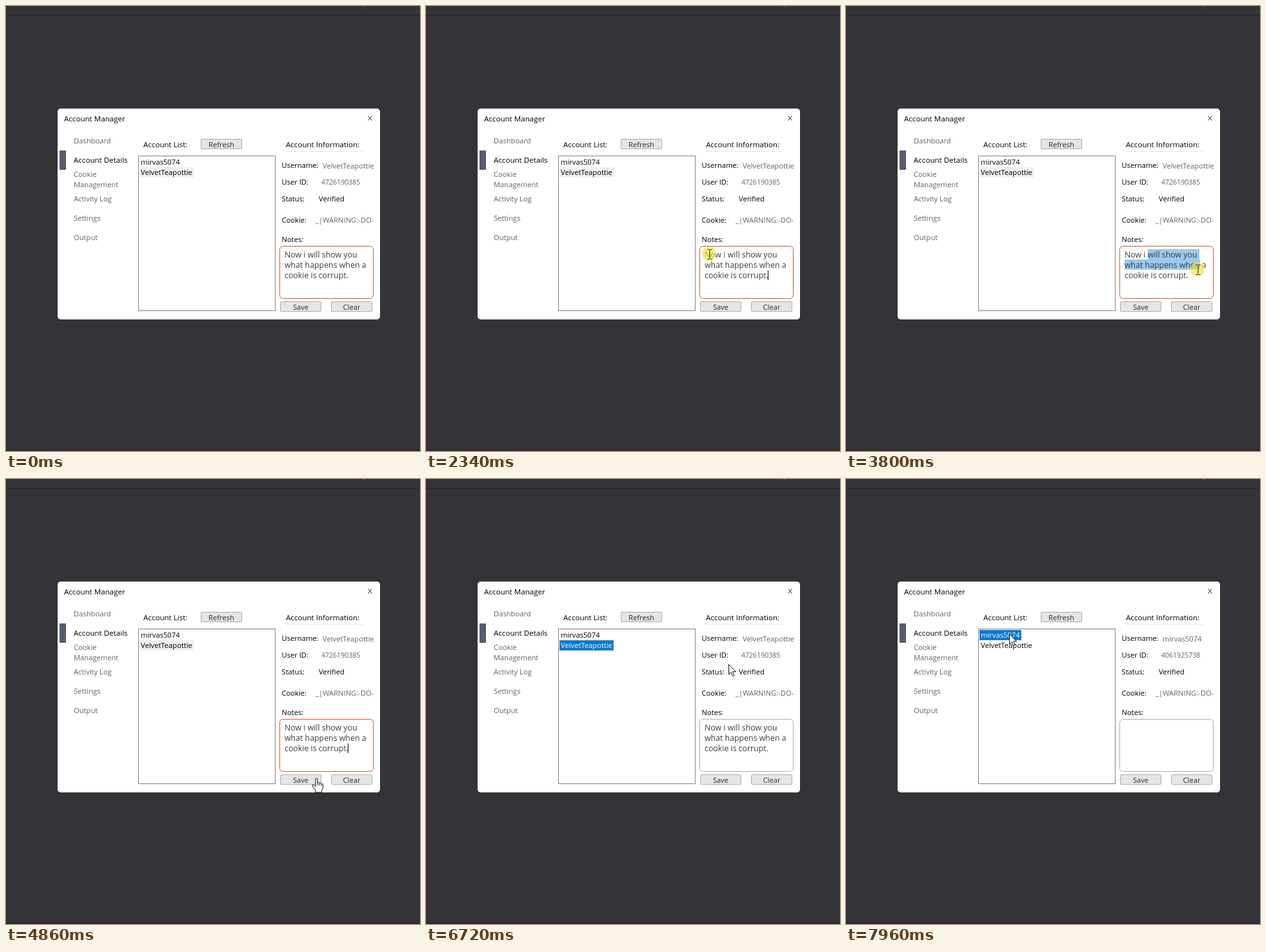
Animation of 642x690 px, one loop 8000 ms. Source, as an HTML page:

```html
<!DOCTYPE html>
<html lang="en">
<head>
<meta charset="utf-8">
<title>Account Manager</title>
<style>
  html, body { margin: 0; width: 642px; height: 690px; overflow: hidden; background: #333338; }
  svg { display: block; }
  text { font: 11.2px "Open Sans", "Noto Sans", sans-serif; fill: #000; }
  .head { font-size: 11.6px; }
  .dim { fill: #626262; }
  .num { font-size: 10.55px; }
  .mid { text-anchor: middle; fill: #2a2a2a; }
  .note { font-size: 12.35px; fill: #3c3c3c; }
  .button { fill: #e5e5e5; stroke: #adadad; }
  .cursor { fill: #fff; stroke: #111; stroke-linejoin: round; }
</style>
</head>
<body>
<svg width="642" height="690" viewBox="0 0 642 690">
  <rect width="642" height="690" fill="#333338"/>
  <path d="M0 14.5H642" stroke="#28282c" stroke-width="2"/>
  <path d="M0 689H642" stroke="#2b282b" stroke-width="2"/>
  <path d="M554 0h3" stroke="#99999c"/>
  <rect x="80" y="159" width="500" height="327" rx="5" fill="#fff" shape-rendering="crispEdges"/>
  <path d="M561.5 170.5l6 7m0 -7l-6 7" stroke="#444" stroke-width="1.1"/>
  <rect x="83" y="224" width="10" height="30" fill="#575c6e"/>
  <path d="M434 225.5H553" stroke="#e6e6e6"/>
  <rect x="205.5" y="232.5" width="212" height="240" fill="#fff" stroke="#82828a"/>
  <rect id="pick" x="207" height="16"/>
  <rect id="focusRing" x="207.5" height="15" fill="none" stroke="#ff8728" stroke-opacity=".6" stroke-dasharray="1"/>
  <rect id="notesBox" x="424.5" y="372.5" width="145" height="81" rx="5" fill="#fff"/>
  <g id="selection" fill="#99c9ef"></g>
  <g id="labels"></g>
  <path id="caret" d="M530.5 410V425" stroke="#000"/>
  <circle id="glow" r="11" fill="#f0e63c" fill-opacity=".65"/>
  <g id="pointer">
    <path id="arrow" class="cursor" d="M.5 .5V16L4 12.7L6.6 18.5L9 17.4L6.5 11.8H11.5Z"/>
    <path id="beam" fill="none" stroke="#222" d="M-3.5 -7.5H-1L0 -6.5L1 -7.5H3.5M0 -6.5V6.5M-3.5 7.5H-1L0 6.5L1 7.5H3.5"/>
    <path id="hand" class="cursor" d="M0 1.5Q0 0 1.5 0T3 1.5V7Q5.5 5.7 6 7.5Q8.4 6.6 9 8.5Q11.5 7.7 11.5 10.5V15L9.5 19V22H0V19L-4.5 13Q-6 10.5 -4 10Q-2.5 9.7 0 13ZM3 7V11M6 8V11.5M9 9V12"/>
  </g>
</svg>
<script>
const LOOP = 8000, START = 190, STEP = 69.35, GLOW = 140;
const LINE = 16, NOTE_X = 432, LIST_Y = 234;
const users = [
  { name: "mirvas5074", id: "4061925738" },
  { name: "VelvetTeapottie", id: "4726190385" }
];
const noteLines = ["Now i will show you", "what happens when a", "cookie is corrupt."];

// When each pointer action happens
const press = { focus: 2220, drag: 2670, release: 4300, deselect: 4360, save: 5190, second: 5980, first: 7740 };
// Pointer key points: time, x, y
const path = [
  [START, 601, 682], [950, 505, 491], [1370, 478, 373], [2080, 432, 384], [2340, 440, 385],
  [press.drag, 468, 383], [3800, 546, 409], [4050, 555, 435], [press.deselect, 540, 413],
  [4800, 480, 464], [5260, 480, 464], [press.second, 263, 257], [6300, 303, 294],
  [6710, 469, 287], [6930, 524, 302], [7610, 281, 251], [press.first, 253, 240]
];

const $ = id => document.getElementById(id);
const set = (node, attrs) => {
  for (const key in attrs) node.setAttribute(key, attrs[key]);
  return node;
};
const show = (node, on) => node.style.display = on ? "" : "none";
const within = (t, a, b) => t >= a && t < b;
const add = (tag, attrs, parent = $("labels")) =>
  parent.appendChild(set(document.createElementNS("http://www.w3.org/2000/svg", tag), attrs));
const label = (x, y, content, style = "") => {
  const node = add("text", { x, y, class: style });
  node.textContent = content;
  return node;
};
const button = (x, y, content) => {
  add("rect", { x: x + .5, y: y + .5, width: 63, height: 15, rx: 1.5, class: "button" });
  label(x + 32, y + 13, content, "mid");
};

label(90, 179, "Account Manager", "head");
label(213, 219, "Account List:", "head");
label(434, 219, "Account Information:", "head");
["Dashboard", "Account Details", "Cookie|Management", "Activity Log", "Settings", "Output"].forEach((entry, row) =>
  entry.split("|").forEach((part, i, parts) =>
    label(105, 213 + 30 * row + LINE * (i - (parts.length - 1) / 2), part, row === 1 ? "head" : "dim")));
["Username:", "User ID:", "Status:"].forEach((name, row) => label(427.5, 251 + 26 * row, name));
["Cookie:", "Notes:"].forEach((name, row) => label(427.5, 336 + 30 * row, name));
label(485, 303, "Verified");
label(480, 336, "_|WARNING:-DO-", "dim");
button(302, 206, "Refresh");
button(425, 458, "Save");
button(504, 458, "Clear");

const items = users.map((user, i) => label(209, LIST_Y + 12 + LINE * i, user.name));
const itemWidths = items.map(item => Math.round(item.getComputedTextLength()) + 4);
const userName = label(491, 252, "", "dim");
const userId = label(489, 277, "", "dim num");
const notes = noteLines.map((line, i) => label(NOTE_X, 390 + LINE * i, line, "note"));
const noteEnds = notes.map(note => Math.round(NOTE_X + note.getComputedTextLength() + 3));
const marks = notes.map((_, i) => add("rect", { y: 377 + LINE * i, height: LINE }, $("selection")));

function pointerAt(t) {
  const next = Math.max(1, path.findIndex(point => point[0] > t));
  if (t >= path.at(-1)[0]) return path.at(-1).slice(1);
  const [t0, x0, y0] = path[next - 1], [t1, x1, y1] = path[next];
  const f = Math.max(0, t - t0) / (t1 - t0);
  return [Math.round(x0 + (x1 - x0) * f), Math.round(y0 + (y1 - y0) * f)];
}

function drawSelection(t, x, y) {
  const start = path.find(point => point[0] === press.drag)[1];
  const line = y < 402 ? 0 : y < 418 ? 1 : 2;
  marks.forEach((mark, i) => {
    const left = i ? NOTE_X : start;
    const right = i < line ? noteEnds[i] : Math.min(x + 3, noteEnds[i]);
    show(mark, within(t, press.drag, press.deselect) && i <= line);
    set(mark, { x: left, width: Math.max(0, right - left) });
  });
}

function drawPointer(t, x, y) {
  const inNotes = within(x, 425, 570) && within(y, 377, 453);
  const onSave = within(x, 425, 489) && within(y, 458, 475);
  show($("pointer"), t >= START);
  set($("pointer"), { transform: `translate(${x} ${y})` });
  show($("arrow"), !inNotes && !onSave);
  show($("beam"), inNotes);
  show($("hand"), onSave);
  const pressed = Object.values(press).some(at => within(t, at, at + GLOW));
  show($("glow"), pressed || within(t, press.drag, press.release));
  set($("glow"), { cx: x - 1, cy: y - .5 });
}

function draw(time) {
  const t = time < START ? 0 : START + Math.floor((time - START) / STEP) * STEP;
  const [x, y] = pointerAt(t);
  const listFocus = t >= press.second - 90;
  const current = t >= press.first ? 0 : 1;
  const rowY = LIST_Y + LINE * current;

  set($("pick"), { y: rowY, width: itemWidths[current], fill: listFocus ? "#0078d7" : "#f0f0f0" });
  set($("focusRing"), { y: rowY + .5, width: itemWidths[current] - 1 });
  show($("focusRing"), listFocus);
  items.forEach((item, i) => item.style.fill = listFocus && i === current ? "#fff" : "");
  userName.textContent = users[current].name;
  userId.textContent = users[current].id;
  notes.forEach(line => show(line, current === 1));
  set($("notesBox"), { stroke: t < press.save + 60 ? "#cc5a30" : "#adadad" });
  show($("caret"), within(t, press.focus, press.drag) || within(t, press.deselect, press.save + 60));
  drawSelection(t, x, y);
  drawPointer(t, x, y);
}

function tick() {
  draw(performance.now() % LOOP);
  requestAnimationFrame(tick);
}
tick();
</script>
</body>
</html>
```
